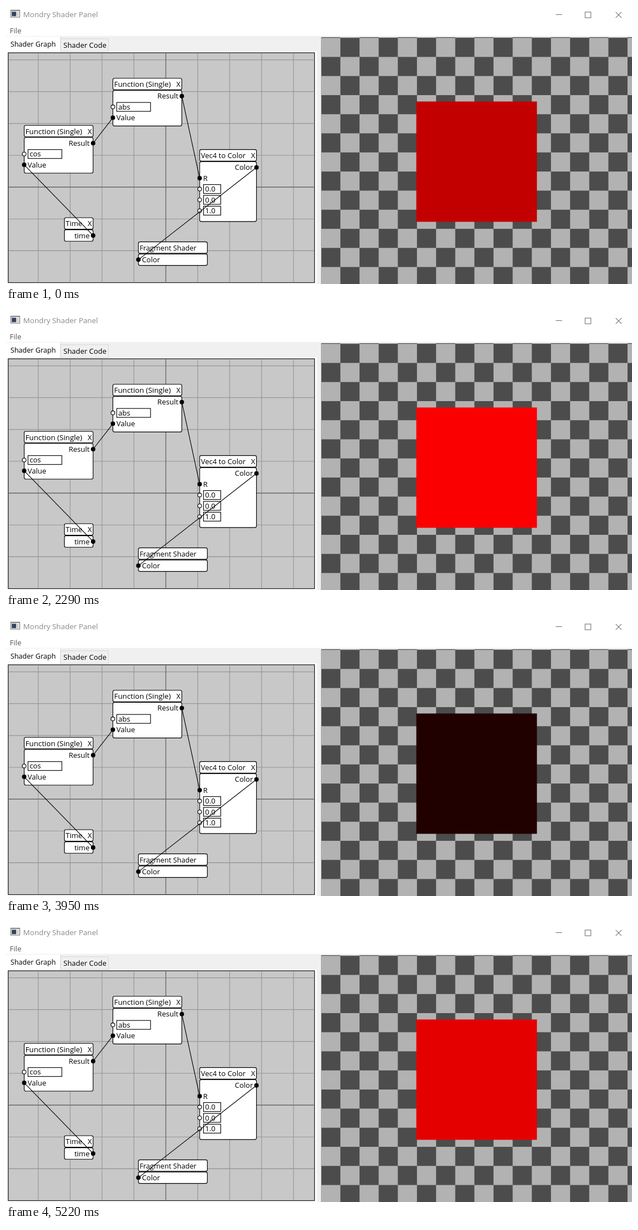
Write an HTML page with a canvas that moves like this. It is 1121x499 px and loops after 5380 ms.

```html
<!DOCTYPE html>
<html lang="en">
<head>
<meta charset="utf-8">
<title>Shader graph</title>
<style>
  html, body { margin: 0; width: 100%; height: 100%; overflow: hidden; background: #fff; }
  canvas { display: block; }
</style>
</head>
<body>
<canvas id="stage" width="1121" height="499"></canvas>
<script>
const ctx = document.getElementById('stage').getContext('2d');
const LOOP = 5380;

// The window is laid out on a 981 px wide pixel grid and enlarged to the stage.
ctx.scale(1121 / 981, 1121 / 981);

function fill(color, x, y, w, h) {
  ctx.fillStyle = color;
  ctx.fillRect(x, y, w, h);
}

function frame(color, x, y, w, h) {
  ctx.strokeStyle = color;
  ctx.strokeRect(x + .5, y + .5, w, h);
}

function line(color, x1, y1, x2, y2) {
  ctx.strokeStyle = color;
  ctx.beginPath();
  ctx.moveTo(x1 + .5, y1 + .5);
  ctx.lineTo(x2 + .5, y2 + .5);
  ctx.stroke();
}

function text(str, x, y, { size = 11.4, color = '#000', align = 'left' } = {}) {
  ctx.font = `${size}px "Open Sans", "Noto Sans", sans-serif`;
  ctx.textAlign = align;
  ctx.fillStyle = color;
  ctx.fillText(str, x, y);
}

function box(x, y, w, h) {
  ctx.beginPath();
  ctx.roundRect(x + .5, y + .5, w, h, 2.5);
  ctx.fillStyle = '#fff';
  ctx.fill();
  ctx.strokeStyle = '#000';
  ctx.stroke();
}

function pin(x, y, linked = true) {
  ctx.beginPath();
  ctx.arc(x + .5, y + .5, 3, 0, 7);
  ctx.fillStyle = linked ? '#000' : '#fff';
  ctx.fill();
  ctx.strokeStyle = '#000';
  ctx.stroke();
}

function node(title, x, y, w, h, { size, closable = true } = {}) {
  box(x, y, w, 18);
  box(x, y + 19, w, h);
  text(title, x + 2.4, y + 14, { size });
  if (closable) text('X', x + w - 1.5, y + 14, { align: 'right' });
}

function output(label, x, y) {
  text(label, x - 5, y + 4.5, { align: 'right' });
  pin(x, y);
}

function input(label, x, y) {
  text(label, x + 6, y + 4.5);
  pin(x, y);
}

function field(value, x, y, w) {
  fill('#fff', x + 6, y - 7, w, 14);
  frame('#000', x + 6, y - 7, w, 14);
  text(value, x + 9, y + 4.5);
  pin(x, y, false);
}

function functionNode(name, x, y) {
  node('Function (Single)', x, y, 108, 56, { size: 11.6 });
  output('Result', x + 108, y + 28);
  field(name, x, y + 45, 53);
  input('Value', x, y + 62);
}

function drawWindow() {
  fill('#fff', 0, 0, 981, 437);
  frame('#777', 7, 6, 14, 11);
  fill('#999', 8, 7, 13, 1);
  fill('#33435c', 9, 9, 7, 7);
  fill('#c9ced4', 17, 9, 3, 7);
  text('Mondry Shader Panel', 27, 17.5, { size: 11.65, color: '#888' });
  text('File', 6, 42.9, { color: '#555' });
  line('#777', 861, 13, 871, 13);
  frame('#777', 907, 9, 9, 9);
  line('#777', 955, 9, 964, 18);
  line('#777', 964, 9, 955, 18);

  fill('#f0f0f0', 0, 47, 981, 390);
  fill('#fff', 0, 71, 487, 366);
  frame('#d9d9d9', 85, 51, 75, 20);
  fill('#fff', 0, 48, 85, 24);
  line('#d9d9d9', 85, 48, 85, 71);
  text('Shader Graph', 7, 64, { size: 11 });
  text('Shader Code', 90, 65.6, { size: 11.3 });
}

function drawGraph() {
  fill('#c8c8c8', 3, 73, 481, 362);
  for (let d = -200; d <= 200; d += 50) {
    line('#969696', 250 + d, 74, 250 + d, 433);
    if (d < 150) line('#969696', 4, 284 + d, 482, 284 + d);
  }
  line('#969696', 4, 384, 482, 384);
  line('#646464', 250, 74, 250, 433);
  line('#646464', 4, 284, 482, 284);
  frame('#111', 3, 73, 480, 361);

  functionNode('abs', 167, 113);
  functionNode('cos', 28, 187);

  node('Vec4 to Color', 303, 225, 89, 94);
  output('Color', 392, 253);
  input('R', 303, 270);
  ['0.0', '0.0', '1.0'].forEach((v, i) => field(v, 303, 287 + i * 17, 27));

  node('Time', 91, 332, 45, 18);
  output('time', 136, 360);

  node('Fragment Shader', 207, 370, 108, 18, { size: 11.1, closable: false });
  input('Color', 207, 398);

  line('#000', 136, 215, 167, 175);
  line('#000', 275, 141, 303, 270);
  line('#000', 28, 249, 136, 360);
  line('#000', 392, 253, 207, 398);
}

function drawChecker() {
  fill('#4c4c4c', 494, 49, 487, 388);
  fill('#b2b2b2', 524, 49, 30, 1);
  for (let c = 1; c < 17; c += 2) fill('#b2b2b2', 494 + c * 30, 49, 30, 1);
  for (let r = 0; r < 13; r++)
    for (let c = r % 2; c < 17; c += 2)
      fill('#b2b2b2', 494 + c * 30, 50 + r * 30, 30, 30);
}

// Moments at which the preview refreshes; the colour holds in between.
const run = (start, count) => Array.from({ length: count }, (_, i) => start + i * 80);
const refreshes = [
  0, 70, 210, ...run(370, 6), ...run(1090, 5), 1570, 1730, 1890, 2050, 2290,
  2920, 3080, 3230, 3390, ...run(3550, 6), ...run(4110, 6), 4670, 4820, 4900, 5060, 5220
];

function drawSquare(now) {
  const t = now % LOOP;
  const held = refreshes.findLast(start => start <= t) || 0;
  const red = Math.round(255 * Math.abs(Math.cos(.703 + .000982 * held)));
  fill(`rgb(${red}, 0, 0)`, 643, 150, 189, 189);
}

const origin = performance.now();
function tick() {
  drawWindow();
  drawGraph();
  drawChecker();
  drawSquare(performance.now() - origin);
  requestAnimationFrame(tick);
}
tick();
</script>
</body>
</html>
```
